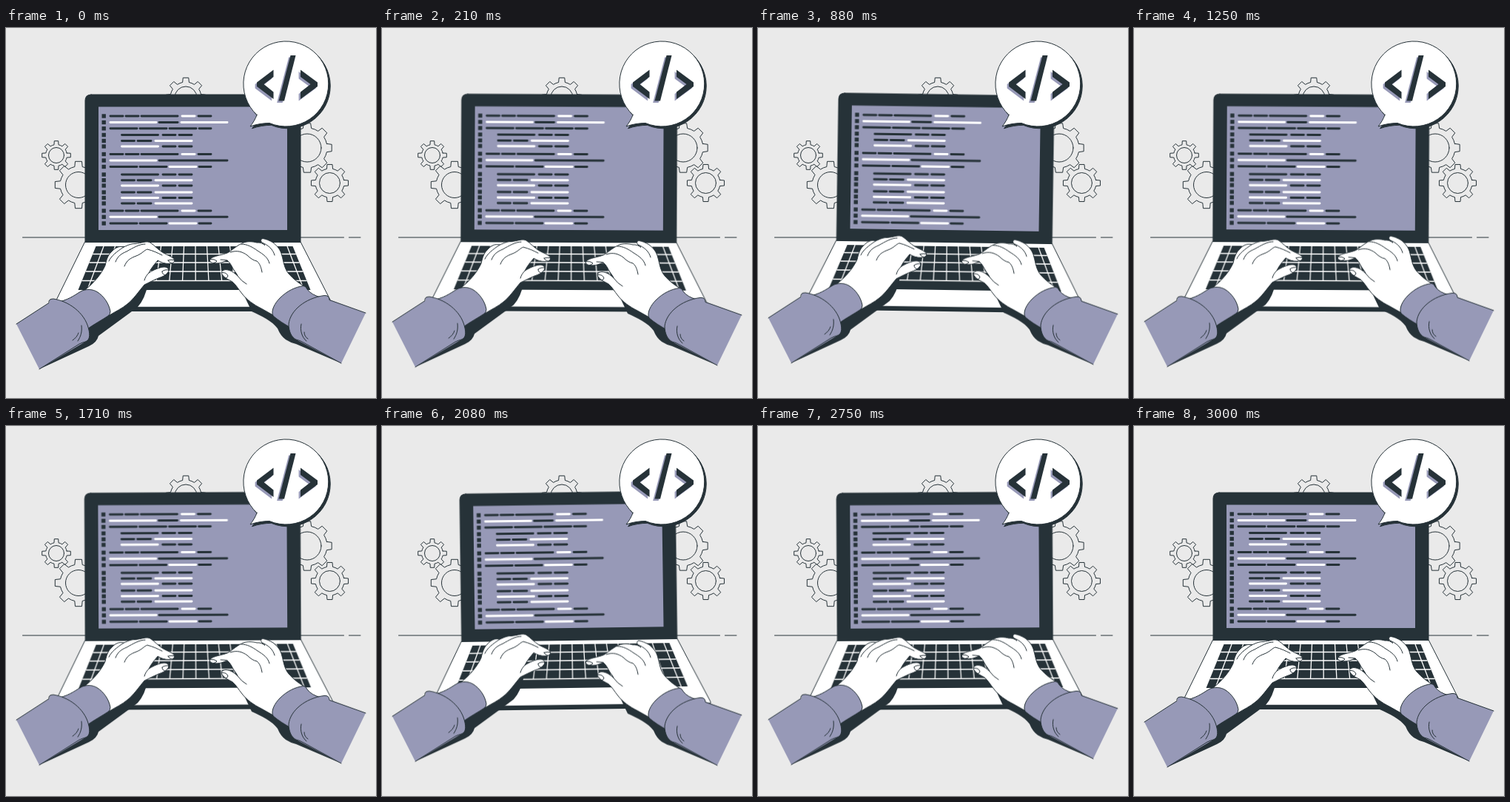
Recreate the animation shown at these times as an HTML page. Size 500 by 500 pixels, loop 3.04 s.

```html
<!DOCTYPE html>
<html lang="en">
<head>
<meta charset="utf-8">
<title>Typing on a laptop</title>
<style>
  html, body { margin: 0; width: 100%; height: 100%; overflow: hidden; background: #eaeaea; }
  svg { display: block; width: 100%; height: 100%; }

  .ink { fill: #263238; }
  .paper { fill: #fff; }
  .tint { fill: #9799b7; }
  .line { stroke: #263238; stroke-width: 1; stroke-linejoin: round; stroke-linecap: round; }
  .none { fill: none; }
  .code { fill: none; stroke-width: 2.9; stroke-linecap: round; }
  .dark { stroke: #263238; }
  .light { stroke: #fff; }

  .laptop, .left, .right { animation: 3.04s linear infinite; }
  .laptop { animation-name: sway; transform-origin: 253px 236px; }
  .left { animation-name: tap-left; }
  .right { animation-name: tap-right; }

  /* Each loop is 3 s of motion and a 40 ms rest */
  @keyframes sway {
    0%, 98.684%, 100% { transform: rotate(0deg); }
    24.671% { transform: rotate(1deg); }
    74.013% { transform: rotate(-1deg); }
  }
  @keyframes tap-left {
    0%, 49.342%, 98.684%, 100% { transform: translateY(0); }
    24.671%, 74.013% { transform: translateY(-10px); }
  }
  @keyframes tap-right {
    0%, 98.684%, 100% { transform: translateY(0); }
    16.447%, 65.789% { transform: translateY(6.67px); }
    41.118%, 90.461% { transform: translateY(-3.33px); }
  }
</style>
</head>
<body>
<svg viewBox="0 0 500 500">
  <defs>
    <g id="a"><path class="dark" d="M141 0h17M162 0h17M183 0h49M260 0h17"/><path class="light" d="M238 0h17"/></g>
    <g id="b"><path class="dark" d="M207 0h25"/><path class="light" d="M141 0h62M237 0h62"/></g>
    <g id="c"><path class="dark" d="M141 0h36M181 0h36M221 0h36M261 0h16"/></g>
    <g id="d"><path class="dark" d="M156.500 0h49M212 0h17M234 0h17"/></g>
    <g id="e"><path class="dark" d="M156.500 0h17M178 0h18"/><path class="light" d="M202 0h49"/></g>
    <g id="f"><path class="dark" d="M212 0h17M234 0h17"/><path class="light" d="M156.500 0h49"/></g>
    <g id="g"><path class="dark" d="M207 0h92"/><path class="light" d="M141 0h62"/></g>
    <g id="h"><path class="dark" d="M141 0h36M181 0h36M261 0h16"/><path class="light" d="M221 0h36"/></g>
    <path id="balloon" d="M339 117.500A57.500 57.500 0 1 1 356 128.500C348 128.500 338 130 330 133C334 128 337 123 339 117.500Z"/>
    <g id="tag">
      <path d="M361.500 56.500V66L348.500 76L361.500 86.500V96L339 79V73.500Z"/>
      <path d="M384.500 37H391.500L376 98.500H368.500Z"/>
      <path d="M398 56.500V66L411.500 76L398 86.500V96L421 79V73.500Z"/>
    </g>
  </defs>

  <path class="line none" d="M22.500 283H456.500M463.500 283H479"/>
  <g id="gears" class="line none"></g>

  <g class="laptop">
    <path class="paper line" d="M107 289H398L442 375Q443 380 438 380H69Q64 380 65 374Z"/>
    <path class="ink" d="M64.500 376.800H442L441 381Q440 383 437 383H70Q66 383 65 380Z"/>
    <path class="ink" d="M121.500 295H387.500L411.500 354H97.500Z"/>
    <path id="keys" class="none" stroke="#fff" stroke-width="1.300"/>
    <path class="ink line" d="M115 90H390Q398 90 398 98V289.500H107V98Q107 90 115 90Z"/>
    <path class="tint" d="M125 106.500H380V273H125Z"/>
    <g id="code" class="code"></g>
  </g>

  <use href="#balloon" class="ink line" x="2.500" y="2.800"/>
  <use href="#balloon" class="paper line"/>
  <use href="#tag" class="tint" x="-2.400" y="2.500"/>
  <use href="#tag" class="ink"/>

  <g class="left">
    <path class="ink" d="M45 461L112 430Q123 425 125 416L166 386L178 377Q188 366 192 345L140 372L100 412Z"/>
    <path class="paper line" d="M103 357C120 344 129 332 134 321C136 312 138 307 142 303C147 297 153 294 159 296C166 293 169 291.500 174 291.500C183 291 190 287 195 290C201 294 206 300 212 303.500C218 307 225 309 227.500 313C228.500 316 225 318.500 221 318.500C214 318.500 210 317 205 314C201 319 197 323 193 331C199 327 207 323.500 213 323C219 322.500 221 327 219 330C216 334 212 336 206 338C199 341 193 344 187 347C180 355 172 367 164 373C157 379 148 383 140 388L112 386Z"/>
    <path class="line none" d="M139 315C142 308 150 302 159 296M148 316C151 308 156 305 163 302C172 297 180 292 188 292M160 322C163 314 168 311 176 308C184 305 187 300 191 299C199 301 205 304 211 307M193 331C190 334 188 337 187 341M219 314Q223 312.500 227 313.500M219 314Q220 317 224 318M211 329Q214 326 220 327M211 329Q211 333 215 334"/>
    <path class="tint line" d="M72 370C88 366 95 359 103 355C110 352.500 117 353 123 356.500C132 362 139 372 141 383Q141 387 138 389C129 395 121 399 111 406Z"/>
    <path class="tint" d="M14 400L59 371Q57 366 64 366C84 369 106 384 111.500 406C114 416 113 422 107 424L45 461Z"/>
    <path class="line none" d="M14 400L58 371.500Q57 366 64 366C84 369 106 384 111.500 406C114 416 113 422 107 424Q103 425 99 427L45 461M97 423C101 417 103 411 102 402M90 422Q96 418 98 412"/>
  </g>

  <g class="right">
    <path class="ink" d="M322 362L332 383C345 389 360 396 367 406Q371 416 378 421Q384 425 392 427L453 453L420 410L362 378Z"/>
    <path class="paper line" d="M403 349C396 345 388 339 382 332C376 325 375 315 373 308C371 299 366 294 361 290C356 287 351 285 347 284.500C344 285 344 288 346 290L350 293.500C347 291 343 289.500 339 290C333 288.500 327 288 321 290C313 293 307 299 300 303.500C292 307 281 307.500 276 312C274 315 277 317.500 281 317.500C288 319 294 316 299 314C303 317 305 322 308 327C310 330 312 332 313 335C308 330 303 327 297 326.500C292 327 290 330 292 333C295 338 301 340 306 343C311 347 314 353 319 359C325 367 335 374 345 379L361 388L390 378Z"/>
    <path class="line none" d="M318 292C326 292 333 296 340 301C348 306 354 310 356 318M303 303C312 300 319 302 326 307C330 311 334 314 339 315C343 318 345 324 346 330M346 290C354 293 361 299 363 307M299 314Q294 313 290 313M313 335Q318 342 325 346M276 312.500Q282 312 285 315Q284 317 281 317.500M292 330.500Q298 330 300 335Q299 338 297 338"/>
    <path class="tint line" d="M361 389C357 382 364 371 370 365C380 355 391 350 402 348.500Q405 348.500 407 353Q413 361 426 364L385 405C376 400 368 395 361 389Z"/>
    <path class="tint" d="M486 385L437 367Q437 361 430 361.500C404 365 384 382 382 400C382 410 386 418 392 421L453 453Z"/>
    <path class="line none" d="M486 385L437 367.500Q437 361 430 361.500C404 365 384 382 382 400C382 410 386 418 392 421Q397 422 402 425L453 453M399 400C397 409 400 418 406 423M403 411Q403 417 408 420"/>
  </g>
</svg>

<script>
  const $ = id => document.getElementById(id);

  // Gear: centre, tip radius, body radius, hole radius
  function gear(cx, cy, tip, body, hole) {
    const at = (r, a) => `${(cx + r * Math.cos(a)).toFixed(2)} ${(cy + r * Math.sin(a)).toFixed(2)}`;
    let d = '';
    for (let i = 0; i < 8; i++) {
      const a = i * Math.PI / 4;
      d += `${i ? `A${body} ${body} 0 0 1 ` : 'M'}${at(body, a - .21)}`
         + `L${at(tip, a - .14)}L${at(tip, a + .14)}L${at(body, a + .21)}`;
    }
    d += `A${body} ${body} 0 0 1 ${at(body, -.21)}Z`;
    return `<path d="${d}"/><circle cx="${cx}" cy="${cy}" r="${hole}"/>`;
  }
  $('gears').innerHTML = [
    [243, 94, 27, 21, 15],
    [68, 172, 19.5, 14.5, 10.5],
    [98, 212, 32, 25, 17.5],
    [407, 162, 33.5, 27, 19],
    [437.5, 209.5, 25.3, 19.5, 14]
  ].map(g => gear(...g)).join('');

  // Key gaps spread towards the front edge
  const spread = y => 1 + (y - 295) * .00306;
  let gaps = '';
  for (const y of [305.5, 317, 329, 341.5]) {
    const half = 133 * spread(y);
    gaps += `M${254.5 - half} ${y}H${254.5 + half}`;
  }
  for (let k = -8; k <= 8; k++) {
    const x = 1.5 + 15.5 * k;
    const end = Math.abs(k) > 5 ? 354 : 341.5;
    gaps += `M${254.5 + x} 295L${254.5 + x * spread(end)} ${end}`;
  }
  $('keys').setAttribute('d', gaps);

  const rows = 'abcdefaghdefefeagh';
  const tops = [119, 127.5, 135.8, 144.5, 152.5, 160, 170.5, 179, 187.5,
                198, 205.7, 213, 222, 229.5, 237, 247, 255.3, 264];
  $('code').innerHTML = tops.map((y, i) =>
    `<use href="#${rows[i]}" y="${y}"/><rect class="ink" x="129.500" y="${y - 2.7}" width="5.400" height="5.400"/>`
  ).join('');
</script>
</body>
</html>
```
